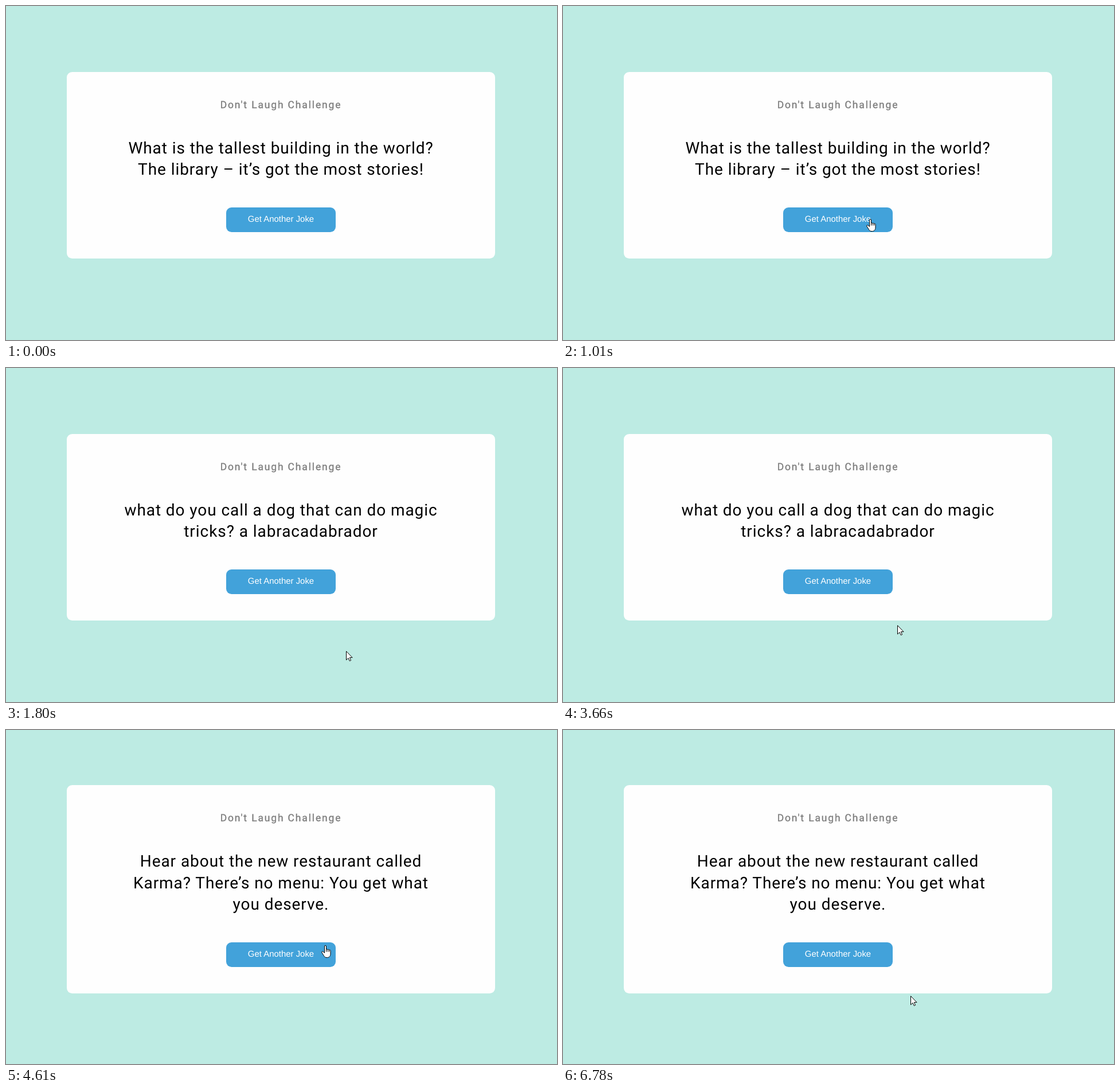
An HTML page that plays this animation: 961 by 582 pixels, repeating every 8 s.

```html
<!DOCTYPE html>
<html lang="en">
<head>
<meta charset="utf-8">
<title>Joke card</title>
<style>
  html, body { margin: 0; width: 100%; height: 100%; overflow: hidden; }
  body { position: relative; background: #bdebe3; }

  .card, .joke, .cursor, .arrow, .hand {
    animation: 8s step-end infinite;
  }

  .card {
    position: absolute;
    left: 106px;
    width: 747px;
    border-radius: 9.33px;
    background: #fefefe;
    font-family: Roboto, Arial, sans-serif;
    text-align: center;
    text-rendering: geometricPrecision;
    white-space: nowrap;
    animation-name: grow;
  }

  h3 {
    position: absolute;
    top: 47px;
    width: 100%;
    margin: 0;
    font-size: 17.47px;
    font-weight: 400;
    line-height: 22px;
    letter-spacing: 1.867px;
    opacity: .5;
    -webkit-text-stroke: .4px #000;
  }

  .joke {
    position: absolute;
    top: 114.33px;
    width: 100%;
    margin: 0;
    font-size: 28px;
    line-height: 37.33px;
    letter-spacing: .933px;
    visibility: hidden;
  }
  .first { animation-name: first; }
  .second { animation-name: second; }
  .third { animation-name: third; }

  .button {
    position: absolute;
    left: 278px;
    bottom: 46.33px;
    width: 191px;
    height: 43px;
    border-radius: 9.33px;
    background: #42a2da;
    color: #fff;
    font: 14.93px/41px "Liberation Sans", Arial, sans-serif;
  }

  .cursor {
    position: absolute;
    left: 0;
    top: 0;
    overflow: visible;
    stroke: #000;
    fill: #fff;
    stroke-linejoin: round;
    animation-name: move;
  }
  .arrow { animation-name: arrow; }
  .hand { animation-name: hand; }

  @keyframes grow {
    0% { top: 114.77px; height: 325.47px; }
    57.625%, 100% { top: 96.1px; height: 362.8px; }
  }
  @keyframes first {
    0% { visibility: visible; }
    17.625%, 100% { visibility: hidden; }
  }
  @keyframes second {
    0% { visibility: hidden; }
    17.625% { visibility: visible; }
    57.625%, 100% { visibility: hidden; }
  }
  @keyframes third {
    0% { visibility: hidden; }
    57.625%, 100% { visibility: visible; }
  }

  @keyframes move {
    0%, 3.875% { transform: translate(731px, 498px); }
    5.75% { transform: translate(564px, 468px); }
    7.625% { transform: translate(550px, 401px); }
    9.5% { transform: translate(540px, 382px); }
    11.0625% { transform: translate(533px, 374px); }
    12.625% { transform: translate(529px, 371px); }
    19.5% { transform: translate(549px, 408px); }
    21% { transform: translate(581px, 470px); }
    22.5% { transform: translate(593px, 493px); }
    45.75% { transform: translate(583px, 448px); }
    47.25% { transform: translate(567px, 409px); }
    48.75% { transform: translate(556px, 386px); }
    50.625% { transform: translate(551px, 375px); }
    52.5% { transform: translate(550px, 375px); }
    81.375% { transform: translate(569px, 412px); }
    83.25% { transform: translate(594px, 446px); }
    84.75%, 100% { transform: translate(606px, 463px); }
  }
  @keyframes arrow {
    0% { visibility: hidden; }
    3.875% { visibility: visible; }
    9.5% { visibility: hidden; }
    19.5% { visibility: visible; }
    48.75% { visibility: hidden; }
    81.375%, 100% { visibility: visible; }
  }
  @keyframes hand {
    0% { visibility: hidden; }
    9.5% { visibility: visible; }
    19.5% { visibility: hidden; }
    48.75% { visibility: visible; }
    81.375%, 100% { visibility: hidden; }
  }
</style>
</head>
<body>
  <div class="card">
    <h3>Don't Laugh Challenge</h3>
    <p class="joke first">What is the tallest building in the world?<br>The library – it’s got the most stories!</p>
    <p class="joke second">what do you call a dog that can do magic<br>tricks? a labracadabrador</p>
    <p class="joke third">Hear about the new restaurant called<br>Karma? There’s no menu: You get what<br>you deserve.</p>
    <div class="button">Get Another Joke</div>
  </div>

  <svg class="cursor" width="17" height="22">
    <path class="arrow" d="M.5.6V15.8L4 12.5 6.3 17.5 8.6 16.5 6.4 11.6H11.1Z"/>
    <g class="hand">
      <path d="M5.5 13.4V2A1.5 1.5 0 0 1 8.5 2V7.6C8.8 6.6 10.9 6.7 11.1 8 11.5 7.1 13.5 7.3 13.7 8.6 14.2 7.8 16 8.1 16 9.7V15C16 18.6 14 21.5 10.4 21.5H9C6.7 21.5 5.6 20.3 4.5 18.5L.9 12.9C0 11.4 1.9 10.1 3.2 11.3Z"/>
      <path fill="none" d="M8.5 7.6V11.5M11.1 8V11.5M13.7 8.6V11.5"/>
    </g>
  </svg>
</body>
</html>
```
